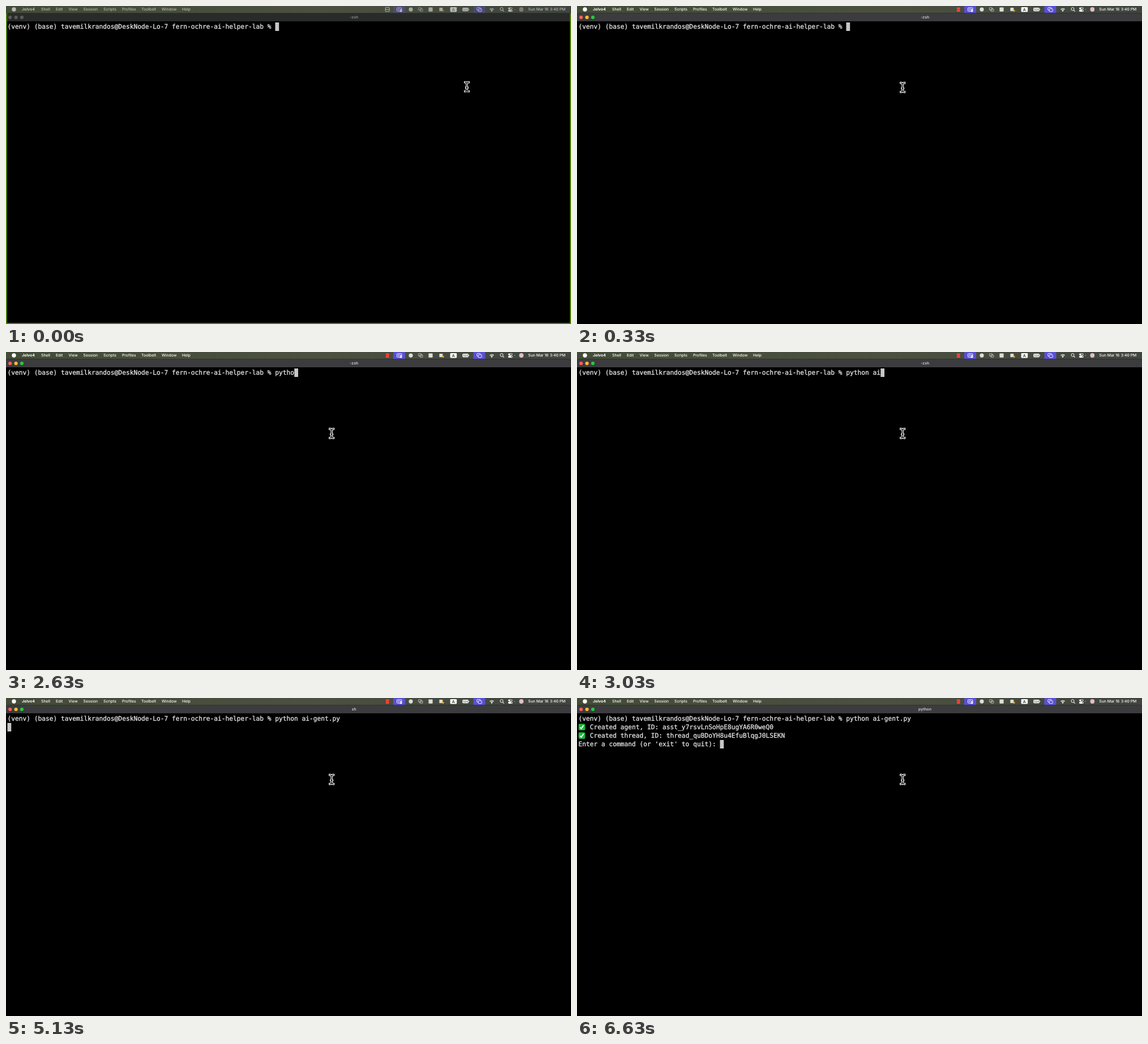
Write an HTML page with a canvas that moves like this. It is 998 px wide and 561 px high and loops after 8 s.

```html
<!DOCTYPE html>
<html lang="en">
<head>
<meta charset="utf-8">
<title>Terminal session</title>
<style>
  html, body { margin: 0; width: 100%; height: 100%; overflow: hidden; background: #000; }
  canvas { display: block; width: 998px; height: 561px; }
</style>
</head>
<body>
<canvas id="stage" width="998" height="561"></canvas>
<script>
const W = 998, H = 561, LOOP = 8000;
const ctx = document.getElementById('stage').getContext('2d');
const SANS = 'Inter, "Liberation Sans", sans-serif';
const MONO = '11.223px "DejaVu Sans Mono", "Liberation Mono", monospace';
const LEFT = 2.5, TOP = 29, COL = 6.757, ROW = 15;

const PROMPT = '(venv) (base) tavemilkrandos@DeskNode-Lo-7 fern-ochre-ai-helper-lab % ';
const COMMAND = 'python ai-gent.py ';
const ASK = "Enter a command (or 'exit' to quit): ";
const KEYS = [1930, 2300, 2380, 2460, 2630, 2760, 2860, 2930, 3030];
const MOVES = [60, 100, 130, 160, 200, 230, 260, 300, 330];
const MENUS = [['Shell', 62], ['Edit', 88], ['View', 110.5], ['Session', 136.5], ['Scripts', 172],
  ['Profiles', 205], ['Toolbelt', 239], ['Window', 275], ['Help', 311]];

const countPast = (times, t) => times.filter(s => t >= s).length;

function text(str, x, y, font, color, align = 'left') {
  ctx.font = font;
  ctx.fillStyle = color;
  ctx.textAlign = align;
  ctx.fillText(str, x, y);
}

function box(x, y, w, h, color, r = 0) {
  ctx.fillStyle = color;
  ctx.beginPath();
  ctx.roundRect(x, y, w, h, r);
  ctx.fill();
}

function frame(x, y, w, h, color, r = 1, line = 0.9) {
  ctx.strokeStyle = color;
  ctx.lineWidth = line;
  ctx.beginPath();
  ctx.roundRect(x, y, w, h, r);
  ctx.stroke();
}

function dot(x, y, r, color) {
  ctx.fillStyle = color;
  ctx.beginPath();
  ctx.arc(x, y, r, 0, Math.PI * 2);
  ctx.fill();
}

function poly(points, color, width) {
  ctx.strokeStyle = color;
  ctx.lineWidth = width;
  ctx.beginPath();
  points.forEach(([x, y]) => ctx.lineTo(x, y));
  ctx.stroke();
}

function wifi(x, y, color) {
  ctx.strokeStyle = color;
  ctx.lineWidth = 1.2;
  for (const r of [2.8, 4.8]) {
    ctx.beginPath();
    ctx.arc(x, y, r, -Math.PI * 0.76, -Math.PI * 0.24);
    ctx.stroke();
  }
  dot(x, y - 0.6, 1.1, color);
}

function fadingIcons(active) {
  const c = '#fff';
  if (active) {
    box(671, 2.4, 5.5, 7.6, '#ff453a', 0.8);
    box(671, 5.8, 5.5, 0.7, '#a82c28');
  } else {
    frame(670.2, 2.4, 7, 7.4, c, 1);
    box(670, 5.6, 7.4, 0.9, c);
  }

  frame(690.5, 2.9, 8.5, 6.2, c, 1);
  box(692, 4.6, 4, 0.8, c);
  box(692, 6.5, 3, 0.8, c);
  dot(697.4, 6.3, 1.2, c);
  box(695.5, 7.8, 4, 2.4, c, 1);

  box(806.3, 3, 10.6, 6.2, c, 1.6);
  box(817.4, 5, 0.9, 2.2, c, 0.4);
  text('52', 807.5, 8, '600 5px ' + SANS, '#454b3f');
  poly([[815.4, 4], [814.2, 6.2], [815.8, 6.2], [814.6, 8.3]], '#454b3f', 0.7);

  frame(831.8, 2.6, 6.2, 4.8, c, 1);
  box(834, 4.6, 6.6, 5.6, '#5a50d2', 1);
  frame(834.2, 4.8, 6, 5, c, 1);

  wifi(858, 9.3, c);
  text('Sun Mar 16', 922.3, 8.4, '500 6.8px ' + SANS, c);
  text('3:40 PM', 988.3, 8.4, '500 6.8px ' + SANS, c, 'right');
}

function steadyIcons(active) {
  const c = '#fff', soft = '#dcded9';
  dot(715, 6.1, 3.6, soft);

  ctx.save();
  ctx.globalAlpha *= 0.75;
  frame(728.4, 2.9, 5.2, 4.2, c, 0.6, 0.8);
  frame(731, 5, 5, 4.2, c, 0.6, 0.8);
  ctx.restore();

  box(746.4, 2.6, 7.2, 7.2, soft, 0.8);
  box(765.4, 3, 6, 6, soft, 0.8);
  dot(771.8, 8.3, 1.8, active ? '#f5a623' : '#b98a3c');
  box(784.6, 1.9, 11.6, 8.5, c, 1.4);
  text('A', 790.4, 8.7, '600 7px ' + SANS, '#30352c', 'center');

  ctx.strokeStyle = c;
  ctx.lineWidth = 1;
  ctx.beginPath();
  ctx.arc(875.5, 5.3, 2.6, 0, Math.PI * 2);
  ctx.stroke();
  poly([[877.4, 7.3], [879.6, 9.6]], c, 1.1);

  frame(887.4, 2.9, 7, 2.6, c, 1.3, 0.8);
  dot(888.9, 4.2, 1.3, c);
  box(887, 6.6, 7.8, 3.3, c, 1.6);
  dot(893, 8.25, 0.9, '#4a5045');
  dot(898.2, 6.1, 1, active ? '#7b6cf0' : '#6c74a8');
  dot(910.3, 6, 3.9, active ? '#dfbccb' : '#a79a97');
}

function menuBar(active, level) {
  const g = ctx.createLinearGradient(0, 0, W, 0);
  g.addColorStop(0, '#434c38');
  g.addColorStop(0.55, '#4b5040');
  g.addColorStop(1, '#40453f');
  ctx.fillStyle = g;
  ctx.fillRect(0, 0, W, 16);

  ctx.save();
  ctx.globalAlpha = level;
  box(684, 0, 21, 12.4, '#5a50d2', 1.5);
  box(825.5, 0, 21, 12.4, '#5a50d2', 1.5);
  ctx.restore();

  ctx.save();
  ctx.globalAlpha = active ? 1 : 0.62;
  dot(14, 6, 3.7, '#fff');
  text('Jelvo4', 28, 8.4, '700 6.9px ' + SANS, '#fff');
  for (const [name, x] of MENUS) text(name, x, 8.4, '500 6.8px ' + SANS, '#fff');
  steadyIcons(active);
  ctx.globalAlpha = active ? level : 0.62;
  fadingIcons(active);
  ctx.restore();
}

function windowFrame(title, active) {
  box(0, 12.5, W, H, '#171817', [4, 4, 0, 0]);
  box(0, 13, W, 14, active ? '#3c3b3e' : '#292a2a', [4, 4, 0, 0]);
  box(0, 27, W, H - 27, '#000');
  const lights = active ? ['#ff5f57', '#febc2e', '#28c840'] : ['#595a59', '#595a59', '#595a59'];
  lights.forEach((c, i) => dot(7.2 + i * 10.4, 20, 3.1, c));
  text(title, 614.6, 22.3, '600 6.8px ' + SANS, active ? '#d2d1d3' : '#8c8d8c', 'center');
  if (!active) {
    const green = '#4f7c08';
    box(0, 13, 2, H - 13, green);
    box(W - 2, 13, 2, H - 13, green);
    box(0, H - 2, W, 2, green);
  }
}

// A hairline stroke gives the terminal text its slightly heavier weight.
function line(str, row, col = 0) {
  const x = LEFT + col * COL, y = TOP + row * ROW + 11.4, color = '#e6e6e6';
  text(str, x, y, MONO, color);
  ctx.strokeStyle = color;
  ctx.lineWidth = 0.3;
  ctx.strokeText(str, x, y);
}

function checkedLine(str, row) {
  const y = TOP + row * ROW;
  box(2.8, y + 1.5, 11.6, 11.6, '#19b83c', 2);
  poly([[5.4, y + 7.6], [7.6, y + 10], [11.6, y + 4.2]], '#fff', 1.8);
  line(str, row, 3);
}

function caret(row, col) {
  box(LEFT + col * COL, TOP + row * ROW, COL, ROW, '#c7c7c7');
}

function terminal(t) {
  const typed = t >= 3400 ? COMMAND.length : countPast(KEYS, t);
  line(PROMPT + COMMAND.slice(0, typed), 0);
  if (t >= 6230) checkedLine('Created agent, ID: asst_y7rsvLnSoHpE8ugYA6R0weQ0', 1);
  if (t >= 6630) {
    checkedLine('Created thread, ID: thread_quBDoYH8u4EfuBlqgJ0LSEKN', 2);
    line(ASK, 3);
    caret(3, ASK.length);
  } else if (t >= 6230) caret(2, 0);
  else if (t >= 3730) caret(1, 0);
  else caret(0, PROMPT.length + typed);
}

function pointer(x, y) {
  ctx.save();
  ctx.translate(x, y);
  ctx.lineCap = 'square';
  ctx.lineJoin = 'round';
  for (const [color, width] of [['#fff', 3.6], ['#000', 1.3]]) {
    ctx.strokeStyle = color;
    ctx.lineWidth = width;
    ctx.beginPath();
    for (const s of [-1, 1]) {
      ctx.moveTo(-3.2, 8 * s);
      ctx.quadraticCurveTo(-0.4, 8 * s, 0, 6 * s);
      ctx.quadraticCurveTo(0.4, 8 * s, 3.2, 8 * s);
    }
    ctx.moveTo(0, -6);
    ctx.lineTo(0, 6);
    ctx.moveTo(-1.1, 1.6);
    ctx.lineTo(1.1, 1.6);
    ctx.stroke();
  }
  ctx.restore();
}

function titleAt(t) {
  if (t < 3730) return '-zsh';
  return t >= 5130 && t < 5830 ? 'sh' : 'python';
}

function draw(t) {
  const step = countPast(MOVES, t);
  const active = step > 0;
  const u = Math.max(0, step - 1) / (MOVES.length - 1);
  const level = 0.34 + 0.66 * u;

  ctx.clearRect(0, 0, W, H);
  ctx.textRendering = 'geometricPrecision';
  menuBar(active, level);
  windowFrame(titleAt(t), active);
  terminal(t);
  if (active) pointer(575.2 + 208 * Math.pow(1 - u, 1.5), 143 + 0.6 * u);
  else pointer(814, 142.5);
}

function tick(now) {
  draw(now % LOOP);
  requestAnimationFrame(tick);
}
draw(0);
requestAnimationFrame(tick);
</script>
</body>
</html>
```
